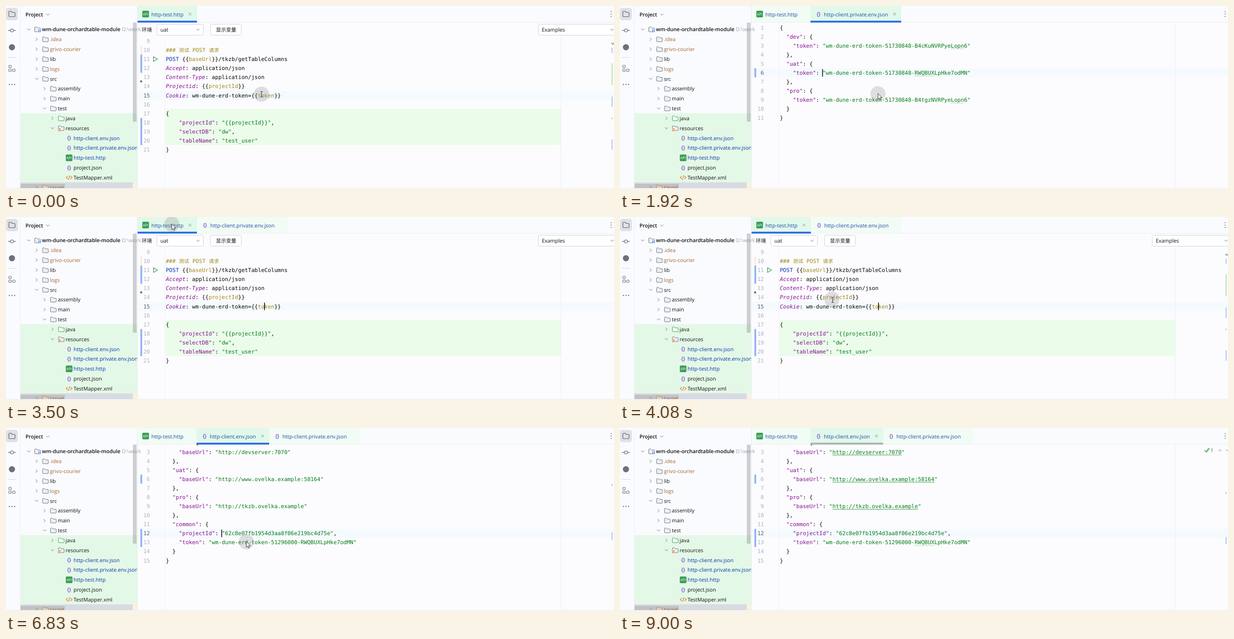
Recreate the animation shown at these times as an HTML page. Size 1280 by 386 pixels, loop 9160 ms.

```html
<!DOCTYPE html>
<html lang="zh">
<head>
<meta charset="utf-8">
<title>HTTP client variables</title>
<style>
  html, body { margin: 0; width: 100%; height: 100%; overflow: hidden; background: #fff; }
  svg { display: block; width: 1280px; height: 386px; text-rendering: geometricPrecision; }
  text { font: 10.93px "Open Sans", "Noto Sans", "Noto Sans CJK SC", sans-serif; fill: #111; }
  .mono { font: 11.51px "DejaVu Sans Mono", "Noto Sans Mono", monospace; fill: #080808; }
  .num { fill: #aeb3c2; text-anchor: end; }
  .cur { fill: #5a5f6e; }
  .bold { font-weight: 600; }
  .han { font-family: "Noto Sans CJK SC", "Noto Sans CJK JP", sans-serif; font-size: 10.7px; }
  .key { fill: #871094; }
  .head { fill: #871094; font-style: italic; }
  .str { fill: #067d17; }
  .var { fill: #a08a18; }
  .verb { fill: #0033b3; }
  .link { fill: #2468c4; }
  .blue { fill: #0a36ae; }
  .tab { fill: #1f4aa6; }
  .brown { fill: #a1682c; }
  .dim { fill: #a3a7b0; }
  .mid { text-anchor: middle; }
</style>
</head>
<body>
<svg id="stage" viewBox="0 0 1280 386" xmlns="http://www.w3.org/2000/svg"></svg>
<script>
const LOOP = 9160, CW = 6.93, X0 = 336.4, ROW = 19.09;
const CHROME = '#fafbfe', PAPER = '#fcfcfe', GREEN = '#ebfceb', GREY = '#6c707e';
const HTTP = '0-1830 3420-6670', PRIV = '1830-3420', ENV = '6670-9160';

const rect = (x, y, w, h, fill, more = '') =>
  `<rect x="${x}" y="${y}" width="${w}" height="${h}" fill="${fill}" ${more}/>`;
const line = (d, stroke = GREY, w = 1, fill = 'none') =>
  `<path d="${d}" stroke="${stroke}" stroke-width="${w}" fill="${fill}" stroke-linecap="round" stroke-linejoin="round"/>`;
const dot = (x, y, r, fill) => `<circle cx="${x}" cy="${y}" r="${r}" fill="${fill}"/>`;
const text = (x, y, s, cls = '', more = '') =>
  `<text x="${x}" y="${y + 4}" class="${cls}" ${more}>${s}</text>`;
const show = (spans, body) => `<g data-on="${spans}">${body}</g>`;
const span = (cls, s) => `<tspan class="${cls}">${s}</tspan>`;
const col = n => X0 + n * CW;

const down = (x, y, c = GREY) => line(`M${x - 3},${y - 1.5}l3,3l3,-3`, c);
const right = (x, y) => line(`M${x - 1.5},${y - 3}l3,3l-3,3`);
const close = x => line(`M${x - 2.5},14.5l5,5m0,-5l-5,5`, '#8b8f9a');
const folder = (x, y, stroke = GREY, fill = '#eff0f4') =>
  line(`M${x - 6},${y - 4}q0,-1 1,-1h3l2,2h5q1,0 1,1v6q0,1 -1,1h-10q-1,0 -1,-1z`, stroke, 1, fill);
const api = (x, y) => rect(x - 7, y - 7, 14, 14, '#3b9c57', 'rx="2"') +
  text(x, y - 1.2, 'API', 'mid', 'style="font-size:7.5px;fill:#fff"');
const braces = (x, y) => text(x, y - 0.5, '{}', 'mid bold', 'style="font-size:11.5px;fill:#7d4fd6"');
const field = (x, w) => rect(x, 38.5, w, 23, '#fff', 'rx="3" stroke="#cfd2db"');

function paint(s) {
  if (s.startsWith('###'))
    return span('var', s.replace(/[\u4e00-\u9fff]+/g, m => span('han', m)));
  return s.replace(/("[^"]*")(:)?|^POST|^[A-Z][\w-]+(?=:)|\{\{(\w+)/g, (m, str, colon, name) =>
    str ? span(colon ? 'key' : 'str', str) + (colon || '')
    : name ? '{{' + span('var', name)
    : span(m === 'POST' ? 'verb' : 'head', m));
}

// A page of code: first row number, its centre line, and the current row
function code(first, y0, current, rows) {
  const yc = y0 + (current - first) * ROW;
  return rect(277, yc - 9.5, 1003, 19, '#f5faff') + rows.map((s, i) => {
    const y = y0 + i * ROW, n = first + i, body = s.trimStart();
    return text(303, y, n, 'mono num' + (n === current ? ' cur' : '')) +
      text(col(s.length - body.length), y, paint(body), 'mono');
  }).join('');
}
const bar = (y, rows, c = '#8fb0f6') => rect(283, y - 9.5, 3.6, rows * ROW, c);
const caret = (n, y, spans) => show(spans, rect(col(n) - 0.8, y - 8, 1.5, 16, '#000'));
const under = (n, len, y, c, dash = '') =>
  `<path d="M${col(n)},${y + 6.5}h${len * CW}" stroke="${c}" stroke-dasharray="${dash}"/>`;
const typo = (n, len, y) => under(n, len, y, '#8cc48c', '2 1');
const guides = y => rect(334, y, 1, 384 - y, '#eff0f4') + rect(1168, y, 1, 384 - y, '#eceef3');
const mark = (y, h, c = '#a9c6f5') => rect(1275, y, 2, h, c);

function httpPage() {
  const y = n => 74 + (n - 9) * ROW;
  return rect(336, 217, 832, 76.5, GREEN) + code(9, 74, 15, [
    '', '### 测试 POST 请求', 'POST {{baseUrl}}/tkzb/getTableColumns',
    'Accept: application/json', 'Content-Type: application/json',
    'Projectid: {{projectId}}', 'Cookie: wm-dune-erd-token={{token}}', '',
    '{', '    "projectId": "{{projectId}}",', '    "selectDB": "dw",',
    '    "tableName": "test_user"', '}'
  ]) + guides(65) +
  bar(y(10), 1, '#fdeadb') + bar(y(11), 2) + bar(y(18), 3) + dot(284.5, 159, 2.2, '#61657a') +
  line('M310.5,107v10l8.5,-5z', '#3b9c57', 1.2, '#f2fcf3') +
  show('5330-6670', rect(col(17), 237, 15 * CW, 16, GREEN) +
    text(col(17), y(18), '"{{projectId}}"', 'mono link') + under(17, 15, y(18), '#2468c4')) +
  caret(26, y(15), '80-1170') + caret(30, y(15), '1580-1830 3420-4580 5080-6080') +
  text(286, 49.5, '环境', 'han') +
  field(317.5, 98) + text(325, 50, 'uat') + down(404, 50) +
  field(430.5, 65) + text(442, 49.5, '显示变量', 'han') +
  field(1120.5, 170) + text(1128, 50, 'Examples') + down(1276, 50) +
  show('0-1830 3920-6670', line('M1275,78l2.5,3l4,-5', '#4aa35c', 1.4) +
    mark(88, 11) + mark(121, 46, '#b2dfb4') + mark(191, 22) + mark(235, 4, '#b2dfb4') + mark(281, 22));
}

function widget(n, spans) {
  return show(spans, line('M1230.5,47l3,3.2l5.5,-7.5m-4,8.5l6,-8', '#4aa35c', 1.3) +
    text(1243, 47, n, '', 'style="fill:#5a5f6e"') +
    line('M1260,48.5l3,-3l3,3') + down(1279, 47));
}

function privPage() {
  const y = n => 45.5 + (n - 1) * ROW;
  const token = s => `    "token": "wm-dune-erd-token-51730848-${s}"`;
  return code(1, 45.5, 6, [
    '{', '  "dev": {', token('B4cKuNVRPyeLopn6'), '  },',
    '  "uat": {', token('RWQBUXLpHke7odMN'), '  },',
    '  "pro": {', token('B4tgzNVRPyeLopn6'), '  }', '}'
  ]) + guides(35) + bar(y(6), 1) +
  typo(52, 4, y(3)) + typo(41, 6, y(6)) + typo(52, 4, y(9)) +
  caret(13, y(6), '1830-2420 2920-3420') +
  show('2250-3420', dot(348.5, 138.5, 4.6, '#f5a623') + rect(346.5, 142, 4, 4.5, '#8a6a2a', 'rx="1"') +
    rect(346.5, 142, 4, 1.5, '#f5a623')) +
  widget(3, '2750-3420') + show('2750-3420', mark(152, 4));
}

function envPage() {
  const y = n => 50.5 + (n - 3) * ROW;
  return code(2, y(2), 12, [
    '  "dev": {', '    "baseUrl": "http://devserver:7070"', '  },',
    '  "uat": {', '    "baseUrl": "http://www.ovelka.example:58164"', '  },',
    '  "pro": {', '    "baseUrl": "http://tkzb.ovelka.example"', '  },',
    '  "common": {', '    "projectId": "62c8e07fb1954d3aa8f06e219bc4d75e",',
    '    "token": "wm-dune-erd-token-51296000-RWQBUXLpHke7odMN"', '  }', '}'
  ]) + guides(35) + bar(y(6), 1) + bar(y(12), 2) +
  show('7170-9160', under(16, 21, y(3), '#3f9a4c') + under(16, 31, y(6), '#3f9a4c') +
    under(16, 26, y(9), '#3f9a4c') + typo(41, 6, y(13))) +
  caret(17, y(12), '6670-7750 8250-8750') +
  show('6670-7750', mark(118, 4) + mark(220, 16)) +
  show('7750-9160', mark(135, 4) + mark(230, 15)) + widget(1, '7750-9160');
}

function tabs() {
  const edge = (x, w, c) => rect(x, 31, w, 4, c);
  const box = (x, w, on) => rect(x, 0, w, on ? 35 : 34, on ? '#e1f8ea' : '#f1fcf5') +
    (on ? edge(x, w, '#3070e8') : '');
  const json = (x, name, w, on) => box(x, w, on) + braces(x + 17, 17) +
    text(x + 28, 17.5, name, 'tab') + (on ? close(x + w - 14) : '');
  const priv = 'http-client.private.env.json';
  return rect(277, 0, 1003, 34, CHROME) + rect(277, 34, 1003, 1, '#ecedf2') +
    show(HTTP, box(277, 125, true) + close(387.5)) +
    show(PRIV + ' ' + ENV, box(277, 124, false)) +
    show('2917-3420', close(387.5)) +
    show(PRIV, json(401, priv, 191, true)) +
    show('3420-6670', json(402, priv, 190, false)) +
    show(ENV, json(401, 'http-client.env.json', 153, true) + json(554, priv, 190, false)) +
    show('9000-9160', edge(401, 153, '#a9b6b4')) + // the window loses focus
    api(294, 17) + text(306, 17.5, 'http-test.http', 'tab') +
    [12, 17, 22].map(y => dot(1274, y, 1.1, GREY)).join('');
}

// Tree rows: depth, open state (1 open, 0 closed, -1 leaf), name, class, icon
const tree = [
  [0, 1, 'wm-dune-orchardtable-module', 'bold', 'root'],
  [1, 0, '.idea', 'brown'], [1, 0, 'grivo-courier', 'brown'], [1, 0, 'lib'], [1, 0, 'logs', 'brown'],
  [1, 1, 'src'], [2, 0, 'assembly'], [2, 0, 'main'], [2, 1, 'test'],
  [3, 0, 'java', '', 'java'], [3, 1, 'resources', '', 'res'],
  [4, -1, 'http-client.env.json', 'blue', 'json'],
  [4, -1, 'http-client.private.env.json', 'blue', 'json'],
  [4, -1, 'http-test.http', 'blue', 'api'],
  [4, -1, 'project.json', '', 'json'], [4, -1, 'TestMapper.xml', '', 'xml'],
  [1, 0, 'target', 'brown', 'out']
];
const icons = {
  root: (x, y) => folder(x, y) + rect(x + 1, y, 6, 6, '#fff') + rect(x + 2, y + 1, 4, 4, '#dbe6ff', 'stroke="#3574f0"'),
  java: (x, y) => folder(x, y, '#3b9c57', '#f2fcf3'),
  res: (x, y) => folder(x, y) + rect(x - 7, y, 7, 7, '#f3f8ee') +
    [0, 2.3, 4.6].map(d => rect(x - 6.5, y + 0.5 + d, 5.5, 1.2, '#d9722e')).join(''),
  out: (x, y) => folder(x, y, '#c58a55', '#fff1e2'),
  json: braces,
  api,
  xml: (x, y) => line(`M${x - 3},${y - 3}l-3.5,3l3.5,3m6,-6l3.5,3l-3.5,3m-1.8,-7l-2.4,8`, '#e0701c', 1.2)
};

function sidebar() {
  const rows = tree.map(([depth, open, name, cls = '', icon], i) => {
    const y = 49.4 + i * 20.83, x = 48 + depth * 16.6;
    return (open < 0 ? '' : open ? down(x, y) : right(x, y)) +
      (icons[icon] || folder)(x + 18.5, y) + text(x + 27.8, y, name, cls);
  }).join('');
  return rect(0, 0, 277, 386, CHROME) + rect(30, 226, 246, 146, '#e4f8e7') +
    rect(30, 372, 246, 12, '#fdf1db') + rect(30, 372, 237, 12, '#d9dbe2') +
    rows + text(244, 49.4, 'D:\\work', 'dim') +
    rect(30, 375, 94, 9, 'rgba(110,100,85,.22)') + rect(267, 35, 8, 209, 'rgba(90,90,90,.27)') +
    rect(276, 0, 1, 384, '#e8eaf0') + rect(29.5, 0, 1, 384, '#eceef4') +
    text(41, 18, 'Project', 'bold') + down(88, 18) +
    rect(0, 4, 25, 26, '#dfe1e7', 'rx="5"') +
    line('M6,12.5q0,-1.5 1.5,-1.5h3l2.5,2.5h4.5q1.5,0 1.5,1.5v6q0,1.5 -1.5,1.5h-10q-1.5,0 -1.5,-1.5z', '#565a66', 1.2) +
    line('M5,51.5h4m7,0h4', GREY, 1.3) +
    '<circle cx="12.5" cy="51.5" r="3.2" fill="none" stroke="#6c707e" stroke-width="1.3"/>' +
    dot(12.5, 87, 6.5, GREY) + rect(3, 108, 19, 1, '#d3d6de') +
    [[6, 125], [6, 133], [14, 133]].map(([x, y]) =>
      rect(x, y, 5, 5, 'none', 'rx="1" stroke="#6c707e" stroke-width="1.2"')).join('') +
    [7, 12.5, 18].map(x => dot(x, 165.5, 1.2, GREY)).join('');
}

const pointer =
  show('0-1830 3917-5330 7410-8490', line('M-2,-5.5h1.3l.7,.7l.7,-.7h1.3M0,-4.8v9.6M-2,5.5h1.3l.7,-.7l.7,.7h1.3', '#222', 1)) +
  show('1830-3917 6670-7410', line('M0,0v11.5l2.6,-2.4l1.9,4.3l2,-.9l-1.9,-4.1h3.6z', '#222', 0.9, '#fff')) +
  show('5330-6670', line('M1,1q1.3,-1.3 2,.5v5l5,1.2q1,.4 .8,2l-.8,4v2h-6v-2l-3.5,-4q-.5,-1.5 1,-1.2l1.5,1.2z', '#222', 0.9, '#fff'));

document.getElementById('stage').innerHTML =
  rect(0, 0, 1280, 386, PAPER) +
  show(HTTP, httpPage()) + show(PRIV, privPage()) + show(ENV, envPage()) +
  tabs() + sidebar() + rect(0, 384, 1280, 1, '#e3e6f0') + rect(0, 385, 1280, 1, '#fff') +
  show('0-8490', '<circle id="halo" r="16" fill="#8c8c94" fill-opacity=".27"/>') +
  `<g id="pointer">${pointer}</g>`;

// Mouse path: time, x, y
const path = [
  [0, 538, 186], [500, 538, 186], [583, 549, 187], [667, 543, 185], [2333, 543, 185],
  [2583, 480, 128], [2833, 372, 35], [3000, 349, 15], [3750, 349, 15], [3917, 392, 92],
  [4083, 446, 173], [4333, 487, 220], [4667, 510, 243], [4917, 506, 240], [7333, 506, 240],
  [7417, 560, 252], [7583, 696, 273], [8333, 1229, 393], [9160, 1229, 393]
];
function mouse(t) {
  const i = Math.max(1, path.findIndex(p => p[0] >= t));
  const [a, ax, ay] = path[i - 1], [b, bx, by] = path[i];
  const k = (t - a) / (b - a);
  return `translate(${ax + (bx - ax) * k} ${ay + (by - ay) * k})`;
}

const parts = [...document.querySelectorAll('[data-on]')].map(el =>
  [el, el.dataset.on.split(' ').map(s => s.split('-').map(Number))]);
const halo = document.getElementById('halo'), hand = document.getElementById('pointer');
const start = performance.now();

function draw() {
  const t = (performance.now() - start) % LOOP;
  const step = Math.floor((t + 6) * 0.012) / 0.012; // the mouse moves at 12 steps a second
  for (const [el, spans] of parts)
    el.style.display = spans.some(([a, b]) => t >= a && t < b) ? '' : 'none';
  halo.setAttribute('transform', mouse(step));
  hand.setAttribute('transform', mouse(step + 10));
  requestAnimationFrame(draw);
}
draw();
</script>
</body>
</html>
```
